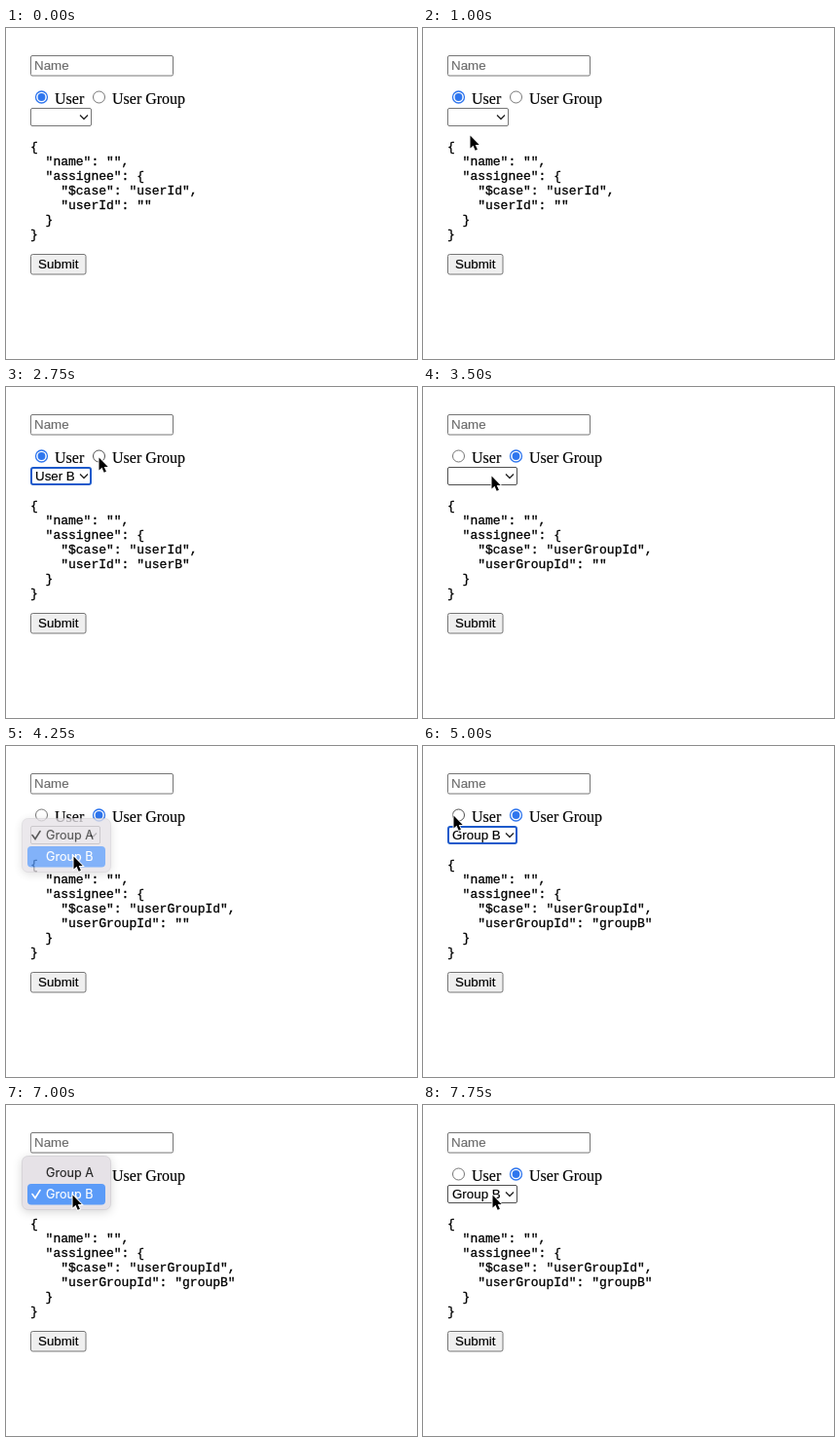
These frames come from a looping animation (422 by 340 pixels, 8000 ms). An HTML page:

```html
<!DOCTYPE html>
<html lang="en">
<head>
<meta charset="utf-8">
<title>Assignee form</title>
<style>
html, body { margin: 0; width: 100%; height: 100%; overflow: hidden; background: #fff; }
svg { display: block; width: 422px; height: 340px; }
text { white-space: pre; }
.ui { font: 13.333px "Liberation Sans", Arial, sans-serif; stroke: currentColor; stroke-width: .15; }
.hint { fill: #6c6c6c; color: #6c6c6c; }
.label { font: 16px "Liberation Serif", Times, serif; stroke: #000; stroke-width: .15; }
.code { font: 13px "Liberation Mono", Courier, monospace; stroke: #000; stroke-width: .3; }
.menu { font: 12.6px Inter, sans-serif; stroke-width: .15; }
#panel { filter: drop-shadow(0 2px 5px rgba(0, 0, 0, .16)); }
</style>
</head>
<body>
<svg viewBox="0 0 422 340">
  <rect x="25.5" y="28.5" width="146" height="20.5" rx="1.5" fill="#fff" stroke="#767676"/>
  <text class="ui hint" x="29" y="43">Name</text>
  <text class="label" x="50" y="77.5">User</text>
  <text class="label" x="109" y="77.5">User Group</text>
  <g id="form"></g>
  <rect x="25.5" y="232.5" width="56.5" height="20.5" rx="2" fill="#efefef" stroke="#767676"/>
  <text class="ui" x="33" y="247">Submit</text>
  <g id="menu"></g>
  <path id="cursor" d="M0 0V13L3 10.3L5.2 15.3L7.4 14.3L5.2 9.5H9.2Z" stroke="#fff" stroke-width="1.8" paint-order="stroke"/>
</svg>
<script>
const $ = id => document.getElementById(id);
const STEP = 250, COUNT = 32, FIRST = 2;

// pointer position for each step, starting at step FIRST
const path = [
  [54, 207], [49, 152], [48, 110], [66, 92], [66, 92], [66, 113], [69, 156],
  [86, 112], [95, 74], [95, 72], [95, 72], [82, 82], [70, 91], [70, 91],
  [69, 113], [69, 113], [64, 106], [42, 82], [31, 71], [31, 71], [31, 71],
  [62, 73], [94, 72], [94, 72], [80, 84], [69, 92], [68, 92], [68, 92],
  [69, 92], [71, 92]
];

// open menus: first step, step of hovering the second row, fading step
const menus = [[6, 7, 8], [15, 16, 17], [28, 28, 30]];
const within = (i, a, b) => i >= a && i < b;

function radio(x, on, hover) {
  const color = on ? (hover ? "#2563d9" : "#2f76ee") : (hover ? "#4f4f4f" : "#767676");
  return `<circle cx="${x}" cy="71" r="6" fill="#fff" stroke="${color}" stroke-width="${on ? 1.3 : 1}"/>` +
    (on ? `<circle cx="${x}" cy="71" r="3.9" fill="${color}"/>` : "");
}

function select(width, value, focus, hover) {
  const x = 25 + width - 8;
  const border = focus
    ? `x="26" y="83" width="${width - 2}" height="17" rx="2" stroke="#1c5acb" stroke-width="2"`
    : `x="25.5" y="82.5" width="${width - 1}" height="18" rx="1.5" stroke="${hover ? "#4f4f4f" : "#767676"}"`;
  return `<rect ${border} fill="#fff"/><text class="ui" x="30" y="96">${value}</text>` +
    `<path d="M${x - 4} 89.5l4 4l4-4" fill="none" stroke="#222" stroke-width="1.3"/>`;
}

function json(key, value) {
  return ["{", '  "name": "",', '  "assignee": {', `    "$case": "${key}",`,
    `    "${key}": "${value}"`, "  }", "}"]
    .map((line, n) => `<text class="code" x="25" y="${126 + n * 15}">${line}</text>`).join("");
}

function menu(name, width, chosen, hover, fading) {
  const top = 75 - chosen * 22;
  const row = n => {
    const y = top + 16.5 + n * 22, lit = n === hover, color = lit ? "#fff" : "#262626";
    return (lit ? `<rect x="22" y="${y - 10.5}" width="${width - 10}" height="21.5" rx="4" fill="#5b9bf8"/>` : "") +
      (n === chosen ? `<path d="M27 ${y}l3 4l5-8" fill="none" stroke="${color}" stroke-width="1.6" stroke-linecap="round"/>` : "") +
      `<text class="menu" x="41" y="${y + 4.5}" fill="${color}" stroke="${color}">${name} ${"AB"[n]}</text>`;
  };
  return `<g opacity="${fading ? .76 : 1}"><rect id="panel" x="16.5" y="${top - .5}" width="${width + 1}" height="55" rx="6" ` +
    `fill="#e6e2e7" stroke="#d0cdd2" stroke-width=".7"/>${row(0)}${row(1)}</g>`;
}

function draw(i) {
  const group = within(i, 12, 21) || i >= 25;
  const name = group ? "Group" : "User";
  const picked = i >= (group ? 18 : 9);
  const focus = within(i, 9, 12) || within(i, 18, 21);
  const key = group ? "userGroupId" : "userId";
  const [x, y] = path[i - FIRST] || [-50, -50];
  const over = (a, b, c, d) => within(x, a, b) && within(y, c, d);
  const width = group ? 72 : 63;

  $("form").innerHTML =
    radio(36.5, !group, over(30, 80, 64, 80)) +
    radio(95.5, group, over(89, 184, 64, 80)) +
    select(width, picked ? name + " B" : "", focus, over(25, 25 + width, 82, 101)) +
    json(key, picked ? name.toLowerCase() + "B" : "");

  const open = menus.find(([a, , c]) => within(i, a, c + 1));
  $("menu").innerHTML = open
    ? menu(name, group ? 90 : 81, +picked, +(i >= open[1]), i === open[2]) : "";
  $("cursor").setAttribute("transform", `translate(${x + .5} ${y + .5})`);
}

let last = -1;
const start = performance.now();
function tick() {
  const i = Math.floor((performance.now() - start) / STEP) % COUNT;
  if (i !== last) draw(last = i);
  requestAnimationFrame(tick);
}
tick();
</script>
</body>
</html>
```
